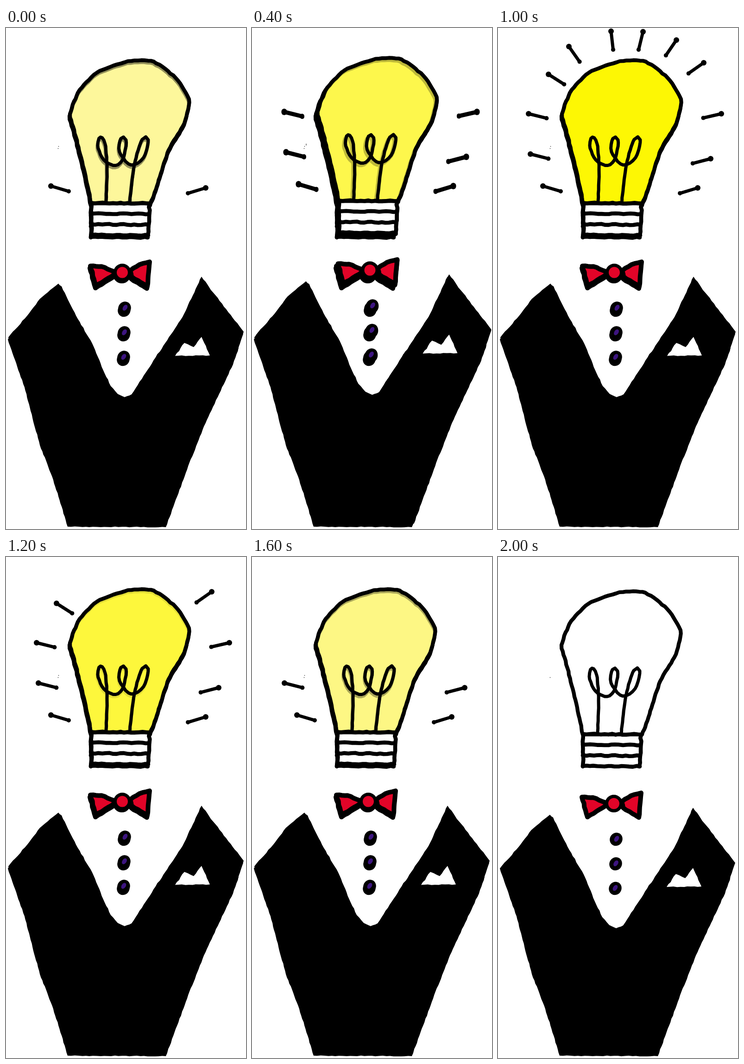
Write an HTML page with a canvas that moves like this. It is 518 by 1081 pixels and loops after 2.2 s.

```html
<!DOCTYPE html>
<html lang="en">
<head>
<meta charset="utf-8">
<title>Bright gentleman</title>
<style>
  html, body { margin: 0; width: 100%; height: 100%; overflow: hidden; background: #fff; }
  canvas { display: block; width: 100vw; height: 100vh; }
</style>
</head>
<body>
<canvas id="stage" width="518" height="1081"></canvas>
<script>
const ctx = document.getElementById('stage').getContext('2d');
const STEP = 200;
let seed = 11;

function rand() {
  seed = (seed * 16807) % 2147483647;
  return seed / 2147483647 - 0.5;
}

// Hand-drawn line through flat x,y pairs; bend 1 gives a smooth curve, 0 straight edges.
function sketch(flat, bend = 0, wobble = 1.5) {
  const n = flat.length / 2;
  const at = i => {
    const k = 2 * Math.max(0, Math.min(n - 1, i));
    return [flat[k], flat[k + 1]];
  };
  const p = new Path2D();
  p.moveTo(...at(0));
  for (let i = 0; i < n - 1; i++) {
    const a = at(i - 1), b = at(i), c = at(i + 1), d = at(i + 2);
    const parts = Math.ceil(Math.hypot(c[0] - b[0], c[1] - b[1]) / 8);
    for (let k = 1; k <= parts; k++) {
      const t = k / parts;
      const spot = [0, 1].map(j => {
        const line = b[j] + (c[j] - b[j]) * t;
        const curve = 0.5 * (2 * b[j] + (c[j] - a[j]) * t +
          (2 * a[j] - 5 * b[j] + 4 * c[j] - d[j]) * t * t +
          (3 * b[j] - a[j] - 3 * c[j] + d[j]) * t * t * t);
        return line + (curve - line) * bend + (k < parts ? rand() * wobble : 0);
      });
      p.lineTo(...spot);
    }
  }
  return p;
}

function closed(flat, bend) {
  const p = sketch([...flat, flat[0], flat[1]], bend);
  p.closePath();
  return p;
}

function oval(x, y, rx, ry = rx, tilt = 0) {
  const p = new Path2D();
  p.ellipse(x, y, rx, ry, tilt, 0, 2 * Math.PI);
  return p;
}

const glass = sketch([
  183, 383, 169, 316, 150, 240, 137, 190, 158, 138, 195, 101, 262, 76,
  318, 77, 365, 112, 394, 158, 384, 210, 350, 268, 325, 345, 311, 383
], 0.6);
glass.closePath();

const coil = sketch([
  215, 381, 217, 310, 213, 255, 203, 240, 197, 258, 210, 289, 236, 301, 253, 283,
  258, 246, 247, 243, 244, 272, 269, 300, 296, 284, 306, 246, 293, 245, 276, 300, 266, 381
], 1, 1);

const cap = new Path2D('M183 383H310L306 452H183Z');
const threads = [0, 1, 2, 3].map(i => sketch([183, 382 + 23 * i, 309 - i, 383 + 23 * i], 0, 2.2));
const sides = [sketch([184, 383, 183, 452], 0, 3), sketch([309, 383, 305, 452], 0, 3)];

const jacket = closed([
  4, 672, 45, 625, 72, 589, 112, 556, 119, 562, 150, 625, 185, 685, 212, 750,
  225, 777, 240, 794, 255, 801, 270, 795, 322, 715, 380, 628, 421, 541, 437, 563,
  512, 660, 490, 726, 427, 860, 388, 960, 345, 1077, 133, 1076, 102, 975, 73, 900, 40, 775
]);
const pocket = closed([364, 712, 384, 684, 404, 693, 421, 671, 439, 711]);
const wings = [
  closed([181, 518, 205, 519, 232, 530, 232, 537, 193, 561]),
  closed([309, 509, 287, 515, 267, 528, 270, 541, 304, 562])
];
const knot = oval(250, 532, 15.5);
const buttons = [0, 1, 2].map(i => oval(255 - i, 609 + 53 * i, 13.5, 14.5, 0.5));
const gems = [0, 1, 2].map(i => oval(256 - 1.5 * i, 608 + 53 * i, 4.5, 7, 0.6));

// Outer knobs, in the way they light up.
const knobs = [
  [97, 341], [431, 345], [70, 272], [459, 282], [66, 185], [482, 185],
  [109, 100], [444, 75], [153, 40], [385, 26], [244, 7], [313, 8]
];

function fill(shape, color = '#000') {
  ctx.fillStyle = color;
  ctx.fill(shape);
}
function line(shape, width, color = '#000') {
  ctx.strokeStyle = color;
  ctx.lineWidth = width;
  ctx.stroke(shape);
}

// Each ray points at the bulb, the lower ones slightly downward.
function drawRay([x, y], dx, dy) {
  const a = Math.atan2(Math.max(y + 50, 200) - y, 266 - x);
  const u = x + 40 * Math.cos(a), v = y + 40 * Math.sin(a);
  ctx.save();
  ctx.translate(dx, dy);
  fill(oval(x, y, 6));
  fill(oval(u, v, 4.6));
  line(new Path2D(`M${x} ${y}L${u} ${v}`), 7);
  ctx.restore();
}

function ghosts(list) {
  const all = new Path2D();
  for (const [x, y] of list) {
    const shift = new DOMMatrix([1, 0, 0, 1, x, y]);
    all.addPath(glass, shift);
    all.addPath(coil, shift);
  }
  return all;
}

function figure([x, y], color, under, shade) {
  ctx.save();
  ctx.translate(x, y);
  fill(glass, color);
  ctx.save();
  ctx.clip(glass);
  ctx.translate(-x, -y);
  line(ghosts(under), 7.5, `rgba(0,0,0,${shade})`);
  ctx.restore();
  fill(cap, '#fff');
  line(glass, 8.2);
  line(coil, 7);
  for (const l of [...threads, ...sides]) line(l, 8.6);
  fill(oval(112.5, 260, 0.8));
  fill(jacket);
  fill(pocket, '#fff');
  for (const w of wings) {
    fill(w, '#e20428');
    line(w, 10);
  }
  fill(knot, '#e20428');
  line(knot, 7);
  buttons.forEach(b => fill(b));
  gems.forEach(g => fill(g, '#3d1580'));
  ctx.restore();
}

const O = [0, 0], A = [1, -4.5], B = [4.5, -7.5], C = [4.5, -9.5], D = [5, 0], E = [-4, -5];

// layers: stacked drawings, last on top; trail: how many of them repeat the side rays
const poses = [
  { layers: [O, A], blue: 155, shade: .42, lit: 2 },
  { layers: [O, A, B], blue: 132, shade: .31, lit: 4 },
  { layers: [O, A, B, C], blue: 76, shade: .25, lit: 6, trail: 2 },
  { layers: [O, A, B, C], blue: 0, shade: .18, lit: 8, trail: 3 },
  { layers: [O, A, B, C, E], blue: 0, shade: .05, lit: 12, trail: 4 },
  { layers: [O, A], blue: 4, shade: 0, lit: 12 },
  { layers: [O, A], blue: 60, shade: .1, lit: 8 },
  { layers: [O, A], blue: 108, shade: .23, lit: 6 },
  { layers: [O, A], blue: 132, shade: .33, lit: 4 },
  { layers: [D], blue: 155, shade: 0, lit: 2, seam: true },
  { layers: [O], blue: 255, shade: 0, lit: 0 }
];
const seam = new Path2D('M364 723L385 720 455 721 460 716 446 682');

function draw({ layers, blue, shade, lit, trail = 1, seam: seamed }) {
  const color = lit ? `rgb(253,247,${blue})` : '#fff';
  ctx.fillStyle = '#fff';
  ctx.fillRect(0, 0, 518, 1081);
  ctx.lineJoin = ctx.lineCap = 'round';
  layers.forEach((at, i) => {
    const top = i === layers.length - 1;
    figure(at, color, top ? layers.slice(-3, -1) : [], shade);
  });
  if (seamed) line(seam, 0.7, '#888');
  knobs.slice(0, lit).forEach((knob, i) => {
    const spots = i < 6 ? layers.slice(-trail) : [A];
    for (const [x, y] of spots) drawRay(knob, x - A[0], y - A[1]);
  });
}

const start = performance.now();
let shown = -1;
function tick(now) {
  const i = Math.floor(Math.max(0, now - start) / STEP) % poses.length;
  if (i !== shown) draw(poses[shown = i]);
  requestAnimationFrame(tick);
}
tick(start);
</script>
</body>
</html>
```
